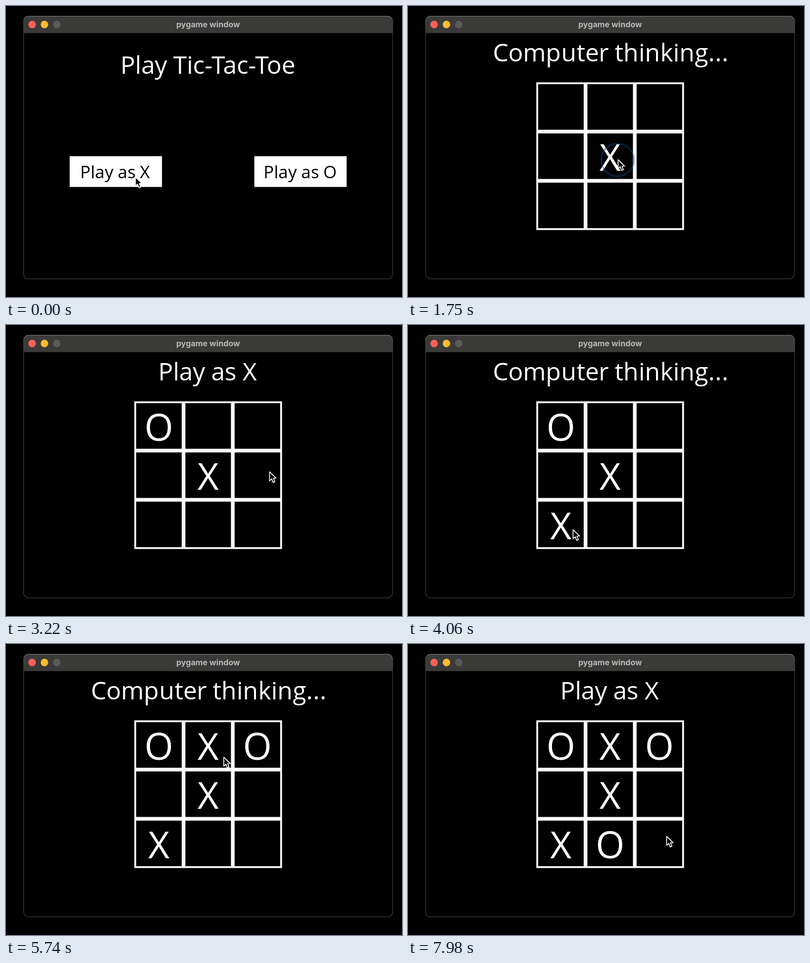
Recreate the animation shown at these times as an HTML page with a canvas. Size 800 px wide and 588 px high, loop 8 s.

```html
<!DOCTYPE html>
<html lang="en">
<head>
<meta charset="utf-8">
<title>pygame window</title>
<style>
  html, body { margin: 0; width: 100%; height: 100%; overflow: hidden; background: #000; }
  canvas { display: block; width: 800px; height: 588px; }
</style>
</head>
<body>
<canvas id="stage" width="800" height="588"></canvas>
<script>
const ctx = document.getElementById('stage').getContext('2d');
const LOOP = 8000, STEP = 70, REST = 280;
const FONT = '"Open Sans", sans-serif';

// The game draws on 600 x 400 units, below a 28 unit title bar.
const S = 746 / 600, LEFT = 35.4, TOP = 54.8, BAR = 28 * S;

const BOARD_AT = 910;
const CLICKS = [1680, 4060, 5320];
const CELLS = [4, 0, 6, 2, 1, 7]; // X and O in turn

// The search gets shorter as the board fills up.
const thinkTime = turn => 500 + 620 / 5 ** turn;

// Pointer stops: arrival time, x, y. It rests a moment at each one.
const STOPS = [
  [140, 261, 344], [700, 257, 339], [1610, 424, 309],
  [2450, 496, 289], [2940, 532, 295], [3920, 333, 412],
  [5180, 428, 207], [6510, 494, 321], [7000, 532, 412], [7840, 522, 387]
];

const ease = p => p * p * (3 - 2 * p);
const clamp = p => Math.max(0, Math.min(1, p));

function pointerAt(t) {
  let [left, x, y] = STOPS[0];
  for (const [arrive, nx, ny] of STOPS) {
    const p = ease(clamp((t - left - REST) / (arrive - left - REST || 1)));
    if (t > left + REST) {
      x += (nx - x) * p;
      y += (ny - y) * p;
    }
    left = arrive;
  }
  return [x, y];
}

// Sets glyphs on whole game units, as the game's font renderer does,
// and centres the visible ink on x.
function label(text, x, y, size, color = '#fff') {
  ctx.save();
  ctx.translate(x, y);
  ctx.scale(S, S);
  ctx.font = `${size}px ${FONT}`;
  ctx.fillStyle = color;
  const width = s => ctx.measureText(s).width;
  const pens = [0];
  for (let i = 1; i < text.length; i++) {
    const a = text[i - 1], b = text[i];
    const kern = width(a + b) - width(a) - width(b);
    pens.push(pens[i - 1] + Math.round(width(a)) + Math.round(kern));
  }
  const first = ctx.measureText(text[0]);
  const last = ctx.measureText(text.at(-1));
  const right = pens.at(-1) + last.actualBoundingBoxRight;
  const shift = (first.actualBoundingBoxLeft - right) / 2;
  pens.forEach((pen, i) => ctx.fillText(text[i], pen + shift, 0));
  ctx.restore();
}

function drawWindow() {
  ctx.fillStyle = '#000';
  ctx.fillRect(0, 0, 800, 588);
  ctx.save();
  ctx.beginPath();
  ctx.roundRect(35, 20, 746.5, 532, 11);
  ctx.clip();
  ctx.fillStyle = '#3a3b39';
  ctx.fillRect(35, 20, 747, BAR);
  ctx.restore();

  const edge = ctx.createLinearGradient(0, 20, 0, 56);
  edge.addColorStop(0, '#747474');
  edge.addColorStop(0.3, '#4c4c4c');
  edge.addColorStop(1, '#3e3e3e');
  ctx.strokeStyle = edge;
  ctx.lineWidth = 1.2;
  ctx.beginPath();
  ctx.roundRect(35.6, 20.6, 745.4, 530.8, 10.5);
  ctx.stroke();

  ['#ff5f57', '#febc2e', '#5a5a5a'].forEach((color, i) => {
    ctx.fillStyle = color;
    ctx.beginPath();
    ctx.arc(LEFT + (14 + 20 * i) * S, 20 + BAR / 2, 6.1 * S, 0, 2 * Math.PI);
    ctx.fill();
  });

  ctx.font = `bold ${13 * S}px Inter, sans-serif`;
  ctx.fillStyle = '#b8b8b8';
  ctx.textAlign = 'center';
  ctx.fillText('pygame window', LEFT + 300 * S, 42.5);
  ctx.textAlign = 'left';
}

function drawButton(text, x) {
  ctx.fillStyle = '#fff';
  ctx.fillRect(LEFT + x * S, TOP + 200 * S, 150 * S, 50 * S);
  label(text, LEFT + (x + 75) * S, 348, 28, '#000');
}

function drawMenu() {
  label('Play Tic-Tac-Toe', 408.7, 137, 40);
  drawButton('Play as X', 75);
  drawButton('Play as O', 375);
}

function drawBoard(t) {
  const busy = CLICKS.some((at, i) => t >= at && t < at + thinkTime(i));
  label(busy ? 'Computer thinking...' : 'Play as X', 408.9, 112, 40);

  ctx.save();
  ctx.translate(LEFT + 180 * S, TOP + 80 * S);
  ctx.scale(S, S);
  ctx.fillStyle = '#fbfbff';
  ctx.fillRect(0, 0, 240, 240);
  ctx.fillStyle = '#000';
  for (let i = 0; i < 9; i++) {
    ctx.fillRect(3 + i % 3 * 80, 3 + Math.floor(i / 3) * 80, 74, 74);
  }
  ctx.restore();

  CELLS.forEach((cell, i) => {
    const turn = i >> 1, reply = i % 2;
    if (t < CLICKS[turn] + reply * thinkTime(turn)) return;
    const col = cell % 3, row = Math.floor(cell / 3);
    label(reply ? 'O' : 'X', LEFT + (220 + col * 80) * S, 234 + row * 80 * S, 60);
  });
}

// A ring follows every press, including the menu button.
function drawRing(t, x, y) {
  const age = [BOARD_AT - 2 * STEP, ...CLICKS].map(at => t - at - STEP)
    .find(a => a >= 0 && a < REST);
  if (age === undefined) return;
  ctx.globalAlpha = clamp((age + STEP) / 140) * clamp((REST - age) / 70);
  ctx.strokeStyle = '#0b4992';
  ctx.lineWidth = 3;
  ctx.beginPath();
  ctx.arc(x - 0.7, y + 2, 33, 0, 2 * Math.PI);
  ctx.stroke();
  ctx.globalAlpha = 1;
}

const arrow = new Path2D('M.8 1.6V18.6L4.8 14.9L7.5 21.6L10.8 20.2L8 13.8L13 13.4Z');

function drawPointer(x, y) {
  ctx.save();
  ctx.translate(x - 0.4, y);
  ctx.scale(1.07, 1.07);
  ctx.lineWidth = 1.6;
  ctx.lineJoin = 'round';
  ctx.strokeStyle = '#fff';
  ctx.fillStyle = '#000';
  ctx.fill(arrow);
  ctx.stroke(arrow);
  ctx.restore();
}

function draw(now) {
  const t = Math.floor(now % LOOP / STEP) * STEP;
  const [x, y] = pointerAt(t);
  drawWindow();
  if (t < BOARD_AT) drawMenu();
  else drawBoard(t);
  drawRing(t, x, y);
  drawPointer(x, y);
}

const start = performance.now();
function tick() {
  draw(performance.now() - start);
  requestAnimationFrame(tick);
}
tick();
</script>
</body>
</html>
```
